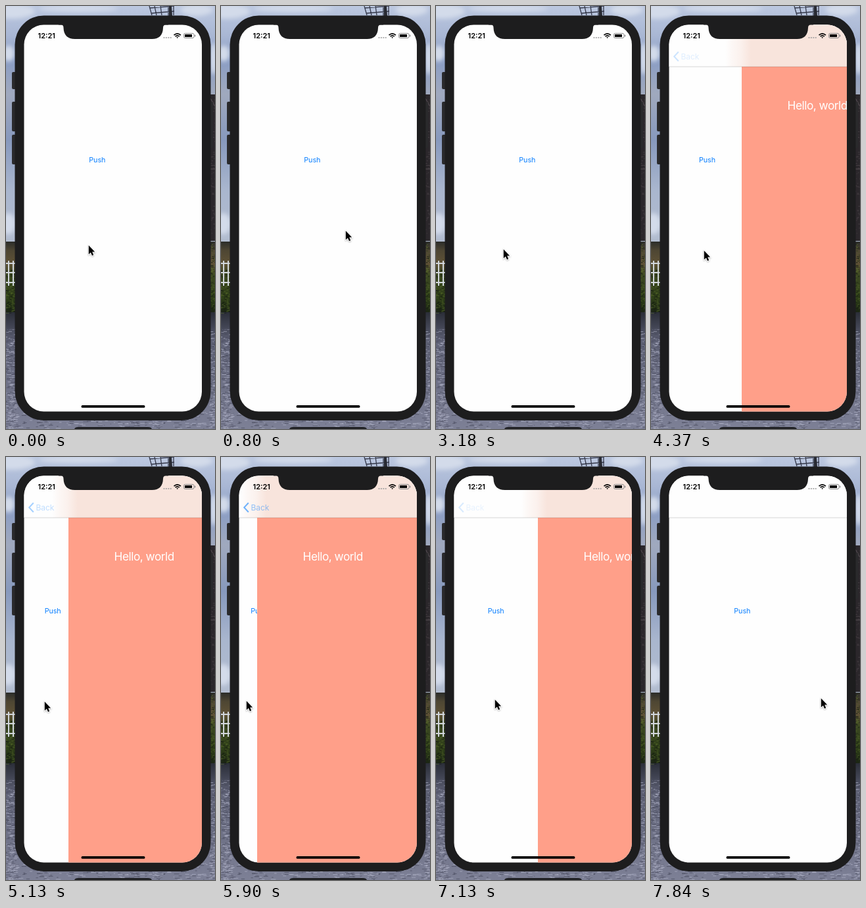
Write an HTML page that moves like this. It is 318 by 641 pixels and loops after 8 s.

```html
<!DOCTYPE html>
<html lang="en">
<head>
<meta charset="utf-8">
<title>Interactive push</title>
<style>
html, body { margin: 0; width: 100%; height: 100%; overflow: hidden; background: #1d1d1e; }
svg { display: block; width: 318px; height: 641px; font-family: Inter, Roboto, sans-serif; }
</style>
</head>
<body>
<svg viewBox="0 0 318 641">
  <defs>
    <linearGradient id="sky" x2="0" y2="1">
      <stop stop-color="#bcc8e0"/><stop offset=".12" stop-color="#a9b7d4"/>
      <stop offset=".22" stop-color="#8a9dc4"/><stop offset=".36" stop-color="#a0a9be"/>
      <stop offset=".55" stop-color="#8799bd"/><stop offset=".75" stop-color="#a9b6ce"/>
      <stop offset="1" stop-color="#b4bed0"/>
    </linearGradient>
    <linearGradient id="bank" x2="0" y2="1">
      <stop stop-color="#2b2d2a"/><stop offset=".12" stop-color="#4e4633"/>
      <stop offset=".3" stop-color="#5f5236"/><stop offset=".45" stop-color="#3b4722"/>
      <stop offset=".75" stop-color="#2f4018"/><stop offset="1" stop-color="#171f14"/>
    </linearGradient>
    <linearGradient id="lake" x2="0" y2="1">
      <stop stop-color="#2b2e38"/><stop offset=".12" stop-color="#414453"/>
      <stop offset=".25" stop-color="#606377"/><stop offset="1" stop-color="#7d8096"/>
    </linearGradient>
    <linearGradient id="blur" gradientUnits="userSpaceOnUse" x1="-25" x2="14">
      <stop stop-color="#f8e4dc" stop-opacity="0"/><stop offset=".25" stop-color="#f8e4dc" stop-opacity=".25"/>
      <stop offset=".6" stop-color="#f8e4dc" stop-opacity=".5"/><stop offset="1" stop-color="#f8e4dc"/>
    </linearGradient>
    <filter id="shade" x="-50%" y="-50%" width="200%" height="200%">
      <feDropShadow dx="0" dy="1" stdDeviation=".8" flood-opacity=".35"/>
    </filter>
    <filter id="soft"><feGaussianBlur stdDeviation="3"/></filter>
    <clipPath id="glass"><rect x="27.500" y="28.500" width="270.500" height="586" rx="30"/></clipPath>
  </defs>

  <!-- landscape -->
  <rect width="318" height="370" fill="url(#sky)"/>
  <g fill="#d3dbea" filter="url(#soft)">
    <ellipse cx="8" cy="8" rx="36" ry="11"/><ellipse cx="110" cy="4" rx="60" ry="5"/>
    <ellipse cx="290" cy="6" rx="24" ry="9"/><ellipse cx="4" cy="72" rx="9" ry="12"/>
    <ellipse cx="3" cy="330" rx="12" ry="16"/><ellipse cx="316" cy="80" rx="6" ry="24"/>
  </g>
  <rect y="357" width="318" height="112" fill="url(#bank)"/>
  <rect y="464" width="318" height="177" fill="url(#lake)"/>
  <path d="M307 134H318V356H307Z" fill="#2b272b"/>
  <path d="M311 140L318 152M311 247H318" stroke="#5a5257"/>
  <g id="texture"></g>
  <path d="M0 390H14M0 404H14M0 419H14M4 386V424M11 386V424" stroke="#d0d5da" stroke-width="2"/>
  <path d="M218 0L222 14M226 0L229 14M235 0L237 14M219 3L256 0M221 11L256 8M247 0V15M255 0V14" stroke="#34384a" stroke-width="1.300"/>
  <path d="M248 0H252L253 15H248Z" fill="#282a33"/>

  <!-- device -->
  <path d="M104 641Q105 638 110 638H216Q221 638 222 641Z" fill="#202124"/>
  <g fill="#2a2a2c">
    <rect x="9" y="100" width="8" height="26" rx="2"/>
    <rect x="9" y="145" width="8" height="45" rx="2"/>
    <rect x="9" y="195" width="8" height="45" rx="2"/>
    <rect x="308" y="145" width="7" height="70" rx="2"/>
  </g>
  <rect x="13.500" y="14.500" width="298" height="613.500" rx="44" fill="#1d1d1e"/>

  <!-- screen -->
  <g clip-path="url(#glass)">
    <rect x="27" y="28" width="272" height="588" fill="#fefefe"/>
    <text id="push" y="237" font-size="10.800" letter-spacing="-.1" fill="#0a7fff">Push</text>
    <g id="page">
      <rect y="92" width="272" height="524" fill="#ff9f89"/>
      <text x="69.600" y="157" font-size="17.300" letter-spacing="-.5" fill="#fff">Hello, world</text>
    </g>
    <g id="bar">
      <rect x="27" y="28" width="272" height="64" fill="#fefefe"/>
      <rect id="tint" x="-25" y="28" width="325" height="64" fill="url(#blur)"/>
      <path d="M27 92H299" stroke="#000" stroke-opacity=".16"/>
      <path id="chevron" d="M41.800 69.500L35.200 76.500L41.800 83.500" fill="none" stroke="#0a7fff" stroke-width="2"/>
      <text id="back" x="45.500" y="80.500" font-size="12" letter-spacing="-.1" fill="#0a7fff">Back</text>
    </g>
    <text x="48.500" y="49" font-size="11" font-weight="600">12:21</text>
    <path d="M239.500 48H252" stroke="#999" stroke-width="1.500" stroke-dasharray="2 1.400"/>
    <g fill="none" stroke="#000" stroke-width="1.700">
      <path d="M255.500 44.200Q260.700 39.400 265.900 44.200M257.600 46.200Q260.700 43.400 263.800 46.200"/>
      <path d="M260.700 49L259.300 47.500Q260.700 46.300 262.100 47.500Z" fill="#000" stroke="none"/>
    </g>
    <rect x="270.500" y="41.500" width="15.500" height="7" rx="2" fill="none" stroke="#888"/>
    <rect x="272" y="43" width="11" height="4" rx=".6"/>
    <rect x="287" y="43.500" width="1.200" height="3" rx=".6" fill="#888"/>
    <rect x="114.500" y="605" width="97" height="3.800" rx="1.900"/>
  </g>
  <path d="M80 26H247V28.500H243Q239 28.500 239 33Q238.500 50 222 50H105Q88 50 87.500 33Q87.500 28.500 84 28.500H80Z" fill="#1d1d1e"/>

  <path id="cursor" d="M.8 .8V14.200L3.900 11.400L6 16.200L8.200 15.300L6.200 10.500H10.200Z" stroke="#fff" paint-order="stroke" stroke-width="1.500" filter="url(#shade)"/>
</svg>
<script>
const LOOP = 8000, LEFT = 28, WIDTH = 270, DRAG_START = 3620;
// pointer path: time, x, y
const path = [
  [0, 125, 362], [60, 125, 362], [400, 302, 164], [850, 175, 361], [930, 187, 363],
  [1620, 187, 364], [1920, 148, 367], [2380, 128, 367], [2440, 128, 368],
  [3180, 102, 368], [3290, 102, 368], [3620, 302, 372], [4090, 83, 370],
  [4370, 80, 370], [4720, 79.5, 370], [5450, 42, 370], [5540, 42, 370],
  [5900, 38, 369], [6330, 28, 369], [6420, 28, 369], [7130, 88.8, 367],
  [7190, 92, 367], [7840, 258, 365], [LOOP, 258, 365]
];
const el = id => document.getElementById(id);
const [push, page, bar, tint, chevron, back, cursor] =
  ["push", "page", "bar", "tint", "chevron", "back", "cursor"].map(el);
const move = (node, x, y = 0) => node.setAttribute("transform", `translate(${x} ${y})`);

function pointerAt(t) {
  const i = path.findIndex(k => k[0] > t);
  const [t0, x0, y0] = path[i - 1], [t1, x1, y1] = path[i];
  const f = (t - t0) / (t1 - t0);
  return [x0 + (x1 - x0) * f, y0 + (y1 - y0) * f];
}

let seed = 7;
const rnd = () => (seed = seed * 16807 % 2147483647) / 2147483647;

// random short strokes inside a box
function scatter(color, count, x, y, w, h, length) {
  let d = "";
  for (let i = 0; i < count; i++)
    d += `M${(x + rnd() * w).toFixed(1)} ${(y + rnd() * h).toFixed(1)}h${(1 + rnd() * length).toFixed(1)}`;
  el("texture").insertAdjacentHTML("beforeend", `<path d="${d}" stroke="${color}" stroke-opacity=".65"/>`);
}

function drawTexture() {
  for (const color of ["#b3b6c9", "#45475a"]) {
    scatter(color, 130, -3, 490, 17, 150, 6);
    scatter(color, 90, 309, 490, 9, 150, 6);
    scatter(color, 150, 0, 615, 318, 26, 7);
  }
  for (const color of ["#55692a", "#141b10"]) {
    scatter(color, 80, -2, 400, 16, 66, 3);
    scatter(color, 60, 309, 360, 9, 104, 3);
  }
  scatter("#4d464b", 60, 311, 140, 7, 214, 3);
}

function render(t) {
  const [x, y] = pointerAt(t);
  const dragging = t >= DRAG_START;
  // the page travels about twice as far as the finger
  const offset = dragging ? Math.min(WIDTH, Math.round(1.98 * (x - LEFT) + 7)) : WIDTH;
  const shown = WIDTH - offset, progress = shown / WIDTH;
  move(cursor, Math.round(x), Math.round(y));
  push.setAttribute("x", 126.3 - shown / 3);
  move(page, LEFT + offset);
  move(tint, LEFT + offset);
  page.setAttribute("visibility", shown > 0 ? "visible" : "hidden");
  tint.setAttribute("opacity", Math.min(1, shown / 30));
  bar.setAttribute("visibility", dragging ? "visible" : "hidden");
  chevron.setAttribute("opacity", 0.75 * progress ** 2.5);
  back.setAttribute("opacity", 0.6 * progress ** 3);
}

drawTexture();
function tick() {
  render(performance.now() % LOOP);
  requestAnimationFrame(tick);
}
tick();
</script>
</body>
</html>
```
